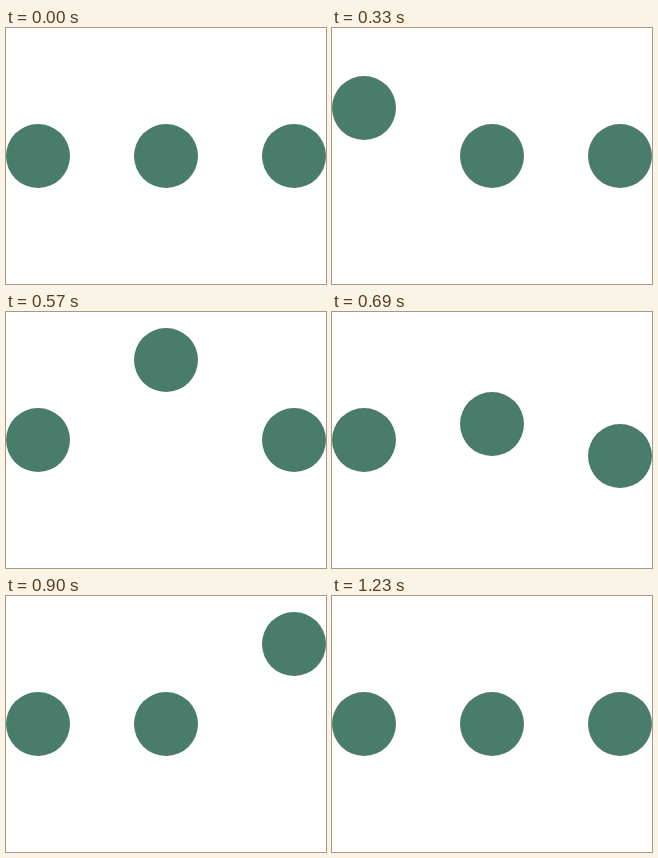
An HTML page that plays this animation: 320 px wide and 256 px high, repeating every 1.38 s.

```html
<!DOCTYPE html>
<html lang="en">
<head>
<meta charset="utf-8">
<title>Bouncing dots</title>
<style>
  html, body { margin: 0; width: 100%; height: 100%; overflow: hidden; background: #fff; }
  svg { display: block; width: 320px; height: 256px; }
  circle { fill: #4a7c6b; }
</style>
</head>
<body>
<svg viewBox="0 0 320 256">
  <circle cx="32" cy="128" r="32"/>
  <circle cx="160" cy="128" r="32"/>
  <circle cx="288" cy="128" r="32"/>
</svg>
<script>
  const LOOP = 1380, TICK = 30, UNIT = 16, DELAY = 11;

  // Turning points of the bounce; it moves two units per tick and slows to one at each turn.
  const turns = [4, -6, 2, -2, 0];

  function bounce() {
    const path = [0];
    let y = 0;
    for (const end of turns) {
      const dir = Math.sign(end - y);
      y += dir;
      path.push(y);
      while (y !== end) {
        y += dir * Math.min(2, Math.abs(end - y));
        path.push(y);
      }
    }
    return path;
  }

  const path = bounce();
  const pose = (y, offset) => ({
    transform: `translateY(${y * UNIT}px)`,
    offset,
    easing: 'step-end'
  });

  document.querySelectorAll('circle').forEach((dot, i) => {
    const frames = path.map((y, k) => pose(y, (i * DELAY + k) * TICK / LOOP));
    dot.animate([pose(0, 0), ...frames, pose(0, 1)], { duration: LOOP, iterations: Infinity });
  });
</script>
</body>
</html>
```
